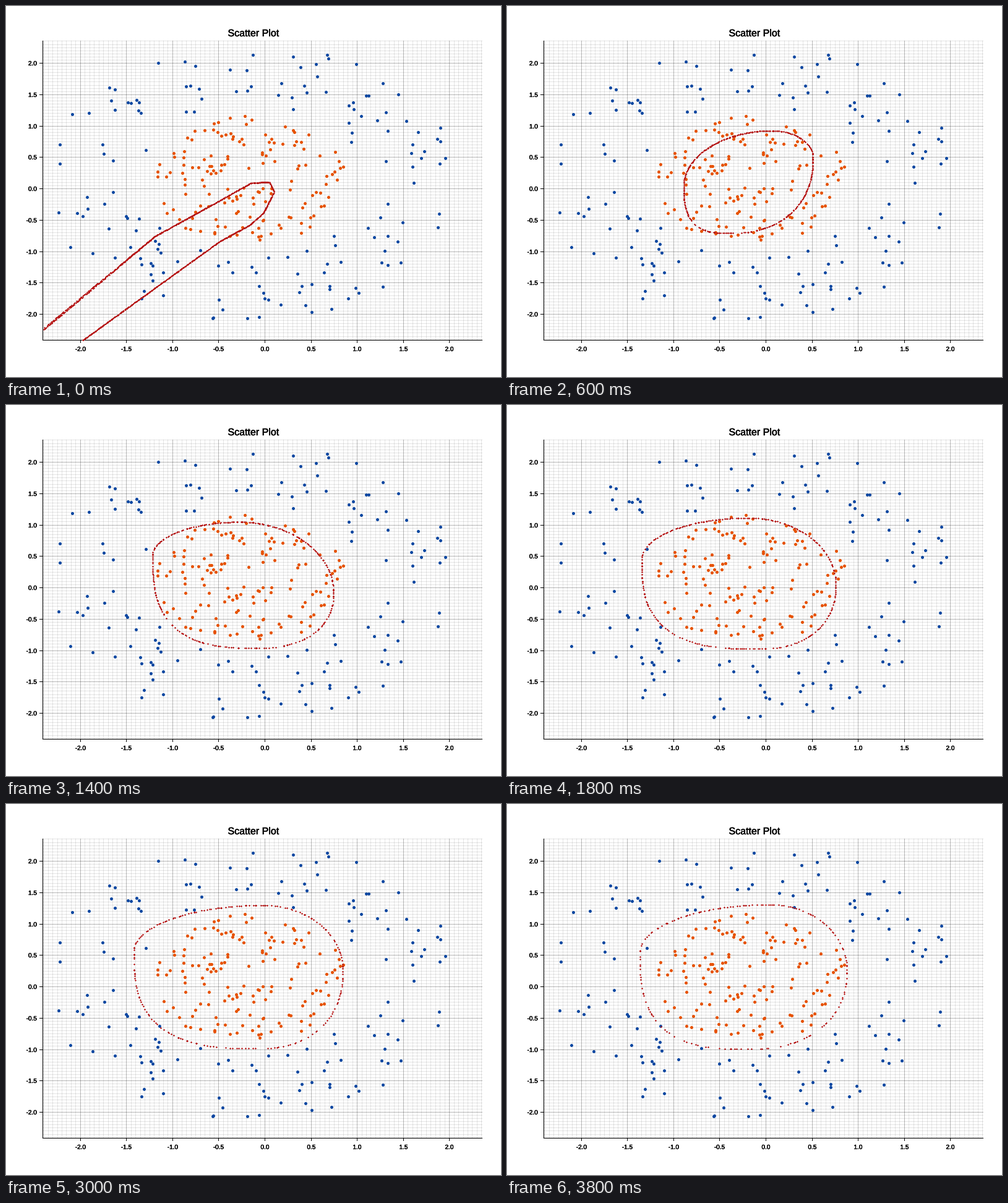
These frames come from a looping animation (800x600 px, 4000 ms). A matplotlib script:

```python
import numpy as np
import matplotlib.pyplot as plt
from matplotlib.animation import FuncAnimation
from matplotlib.patheffects import withStroke

W, H, DPI = 800, 600, 100
PX = 72 / DPI                       # points per pixel
FRAMES, STEP = 20, 200
LEFT, RIGHT, TOP, BOTTOM = 60, 770, 56, 540
BLUE, ORANGE, RED = "#0d47a1", "#e65100", "#b71c1c"

fig = plt.figure(figsize=(W / DPI, H / DPI), dpi=DPI, facecolor="white")
ax = fig.add_axes([0, 0, 1, 1])
ax.set(xlim=(0, W), ylim=(H, 0))
ax.axis("off")


def to_x(v):
    return 418.5 + 149.1 * v


def to_y(v):
    return 295.5 - 101.5 * v


def snap(p):
    return np.floor(p) + 0.5


def line(x0, y0, x1, y1, alpha=1.0):
    ax.plot([x0, x1], [y0, y1], color="black", alpha=alpha, lw=PX,
            solid_capstyle="butt", snap=False, zorder=1)


def label(x, y, text, size, ha="center"):
    ax.text(x, y, text, size=size * PX, family="Liberation Sans",
            color="black", ha=ha, va="baseline",
            path_effects=[withStroke(linewidth=0.5 * PX, foreground="black")])


def draw_axes():
    for i in range(-48, 48):
        v, major = i * 0.05, i % 10 == 0
        alpha = 0.28 if major else 0.1
        x, y = snap(to_x(v)), snap(to_y(v))
        if LEFT < x < RIGHT:
            line(x, TOP, x, BOTTOM, alpha)
        if TOP < y < BOTTOM:
            line(LEFT, y, RIGHT, y, alpha)
        if major:
            line(x, BOTTOM, x, BOTTOM + 5)
            line(LEFT - 6, y, LEFT, y)
            label(x, 558, f"{v:.1f}", 10)
            label(50, y + 3.5, f"{v:.1f}", 10, ha="right")
    line(LEFT - 0.5, TOP, LEFT - 0.5, BOTTOM + 1)
    line(LEFT - 1, BOTTOM + 0.5, RIGHT, BOTTOM + 0.5)
    label(400, 49, "Scatter Plot", 16)


def ring(rng, n, inner, outer, power):
    """Random pixel positions in a ring around the middle of the data."""
    r = inner + (outer - inner) * rng.random(n) ** power
    a = rng.uniform(0, 2 * np.pi, n)
    p = np.c_[to_x(-0.17 + r * np.cos(a)), to_y(0.13 + r * np.sin(a))]
    return snap(p)


def draw_classes():
    rng = np.random.default_rng(7)
    for color, *shape in ((BLUE, 158, 1.22, 2.24, 0.9),
                          (ORANGE, 150, 0, 1.04, 0.5)):
        ax.scatter(*ring(rng, *shape).T, s=(5 * PX) ** 2, color=color,
                   lw=0, zorder=3)


# First guess of the decision boundary: an open lobe
LOBE = np.array([(58, 524), (240, 372), (300, 339), (395, 286), (425, 284),
                 (433, 300), (415, 335), (393, 354), (345, 380), (122, 541)])

# Later it closes: its right, top, left and bottom tips over time
TIPS = {
    200: [(470, 258), (425, 176), (305, 300), (385, 357)],
    400: [(514, 165), (492, 83), (305, 290), (390, 357)],
    600: [(494, 245), (428, 201), (285, 291), (360, 367)],
    800: [(503, 312), (330, 173), (210, 220), (400, 371)],
    1000: [(513, 320), (350, 183), (245, 230), (412, 373)],
    1200: [(528, 310), (370, 192), (246, 240), (408, 392)],
    1800: [(531, 290), (390, 182), (217, 249), (407, 394)],
    3000: [(544, 268), (415, 163), (206, 238), (410, 395)],
    3800: [(549, 268), (424, 162), (214, 240), (390, 396)],
}
FULLNESS = 1, 1, 0.7, 0.9           # lower exponent, rounder quarter


def tips_at(t):
    times = list(TIPS)
    tracks = np.reshape(list(TIPS.values()), (len(times), 8)).T
    return np.reshape([np.interp(t, times, track) for track in tracks], (4, 2))


def outline(t):
    """Closed curve of four superellipse quarters from tip to tip."""
    if t == 0:
        return LOBE
    tips = tips_at(t)
    a = np.linspace(0, np.pi / 2, 60)
    path = []
    for i, power in enumerate(FULLNESS):
        p, q = tips[i], tips[(i + 1) % 4]
        c, s = np.cos(a).clip(0) ** power, np.sin(a) ** power
        if i % 2 == 0:              # starts on a side tip
            x, y = q[0] + (p[0] - q[0]) * c, p[1] + (q[1] - p[1]) * s
        else:
            x, y = p[0] + (q[0] - p[0]) * s, q[1] + (p[1] - q[1]) * c
        path.append(np.c_[x, y])
    return np.concatenate(path)


def boundary(frame):
    """Random samples along the outline, thinning out over time."""
    t = frame * STEP
    rng = np.random.default_rng(40 + frame)
    path = outline(t)
    arc = np.r_[0, np.cumsum(np.hypot(*np.diff(path, axis=0).T))]
    n = 1000 if t == 0 else int(np.interp(t, [200, 1000, 3800],
                                          [400, 340, 200]))
    s = (np.arange(n) + rng.uniform(-0.9, 0.9, n)) / n % 1 * arc[-1]
    p = np.c_[np.interp(s, arc, path[:, 0]), np.interp(s, arc, path[:, 1])]
    if t == 0:
        # the far end of the upper branch is a double line
        spread = np.clip((300 - p[:, 0]) / 200, 0.1, 1) * (s < arc[-1] / 2)
        p[:, 1] += rng.choice([-1, 1], n) * spread
    else:
        # sparser along the bottom edge
        p = p[(p[:, 1] < 340) | (rng.random(n) < 0.65)]
    return snap(p[(p[:, 0] >= LEFT) & (p[:, 1] <= BOTTOM)])


draw_axes()
draw_classes()
dots = ax.scatter([], [], s=(3 * PX) ** 2, marker="+", color=RED,
                  linewidths=PX, snap=False, zorder=4)


def update(frame):
    dots.set_offsets(boundary(frame))
    return dots,


anim = FuncAnimation(fig, update, frames=FRAMES, interval=STEP,
                     repeat=True, repeat_delay=0)
plt.show()
```
